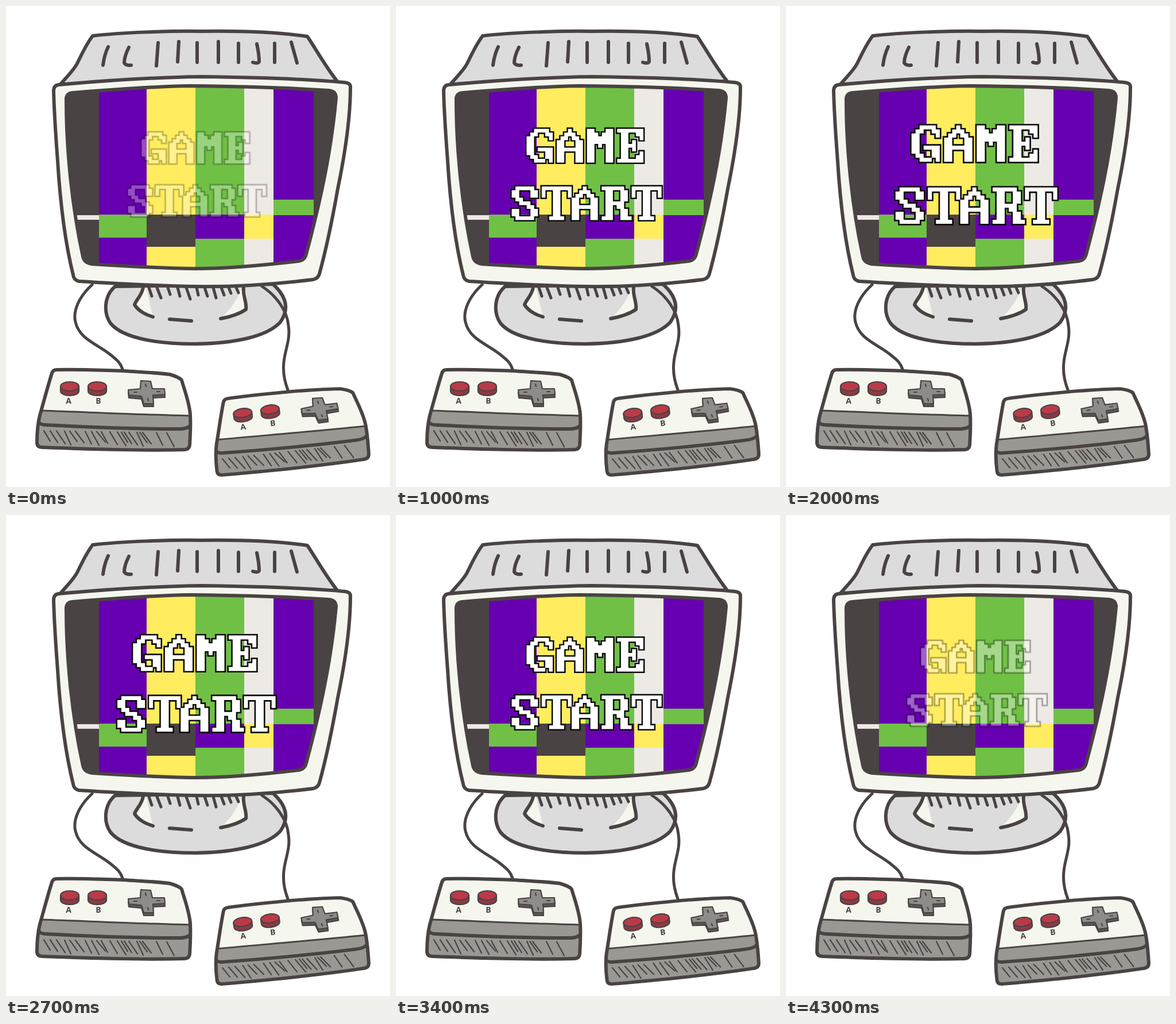
Write an HTML page that moves like this. It is 669 px wide and 837 px high and loops after 4.4 s.

```html
<!DOCTYPE html>
<html lang="en">
<head>
<meta charset="utf-8">
<title>Game start</title>
<style>
  html, body { margin: 0; width: 100%; height: 100%; overflow: hidden; background: #fff; }
  svg { display: block; width: 100%; height: 100%; }
  .ink { stroke: #4a4343; stroke-width: 6; stroke-linecap: round; stroke-linejoin: round; fill: none; }
  .thin { stroke-width: 2.2; }
  .mid { stroke-width: 5; }
  .shell { fill: #dcdcdc; }
  .cream { fill: #f5f7ef; }
  .dark { fill: #4a4343; }
  .purple { fill: #6700b0; }
  .yellow { fill: #ffed5f; }
  .green { fill: #70c046; }
  .beige { fill: #ede9e4; }
  .grey { fill: #999892; }
  .label { font: 700 14px "Open Sans", sans-serif; fill: #4a4343; text-anchor: middle; }
  #title path { fill: #fff; fill-rule: evenodd; stroke: #0b0b0b; stroke-width: .76; paint-order: stroke; }
</style>
</head>
<body>
<svg viewBox="0 0 669 837">
  <defs>
    <path id="glass" d="M105 165Q104 152 116 151C190 145 260 140 320 139C410 140 490 142 562 147Q575 148 575 160C566 260 545 350 523 432Q520 443 509 444C450 451 390 457 330 457C270 456 210 453 150 449Q136 447 134 436C115 350 105 250 105 165z"/>
    <clipPath id="screen"><use href="#glass"/></clipPath>
    <path id="cross" d="M235 652L252 653L255 666L276 666L277 676L256 677L257 692L240 692L236 679L214 677L213 668L234 666z"/>
    <path id="case" d="M88 633C130 632 165 634 205 635C235 637 262 638 285 641Q302 646 306 651C312 672 320 692 321 712C322 732 321 748 320 764Q319 772 310 772C228 774 145 771 64 768Q54 768 54 760C54 744 55 728 59 712C66 688 72 664 80 639Q82 633 88 633z"/>
    <g id="button">
      <path class="ink thin" style="fill:#8c3a44" d="M95 662v8a16 8 0 0 0 32 0v-8z"/>
      <ellipse class="ink thin" style="fill:#bb3a48" cx="111" cy="662" rx="16" ry="8"/>
    </g>
    <g id="pad">
      <use href="#case" class="cream"/>
      <path class="grey" d="M62 704C148 707 235 710 321 713C322 732 321 748 320 764Q319 772 310 772C228 774 145 771 64 768Q54 768 54 760C54 744 55 728 62 704z"/>
      <path class="ink" style="stroke-width:3" d="M63 704C148 707 235 711 320 713"/>
      <path class="ink" d="M57 724Q60 729 70 729C145 733 220 736 300 736Q317 736 321 730"/>
      <path id="hatch" class="ink thin"/>
      <use href="#case" class="ink"/>
      <use href="#button"/>
      <use href="#button" x="48"/>
      <text class="label" x="109" y="692">A</text>
      <text class="label" x="161" y="692">B</text>
      <g class="ink thin">
        <use href="#cross" y="5" fill="#5c5856"/>
        <use href="#cross" fill="#8d8c88"/>
        <path d="M243 658l1 4M223 672h5M263 671h5M247 683l1 4"/>
      </g>
    </g>
  </defs>

  <!-- Stand -->
  <path class="ink shell" d="M190 488C170 505 170 535 182 552C205 580 270 588 330 588C400 587 455 575 478 550C492 530 492 508 465 484z"/>
  <path class="cream" d="M239 490C236 505 226 512 224 520C232 532 244 537 256 541L244 490zM414 490C412 505 420 515 418 528C405 537 390 541 374 544Q400 520 411 490z"/>
  <path class="ink" d="M239 490C236 505 226 512 224 520C232 532 244 537 256 541M414 490C412 505 420 515 418 528C405 537 390 541 374 544M285 545L323 548"/>
  <path class="ink mid" d="M249 490l5 15M263 490l7 18M282 490l4 12M299 490l4 15M314 490l7 20M332 490l3 13M346 490l5 15M361 490l5 18M375 490l5 13M388 490l4 10M401 490l4 9"/>

  <!-- Cables -->
  <path class="ink mid" d="M150 485C128 505 116 530 121 550C128 580 159 588 181 606C195 617 200 622 203 632M446 488C470 503 490 530 492 556C496 580 486 598 484 620C482 638 486 655 491 668"/>

  <!-- Monitor -->
  <path class="ink shell" d="M95 136C105 124 118 112 124 100C133 82 140 66 151 52C200 46 290 43 340 44C400 43 470 45 525 53C540 75 555 103 577 131z"/>
  <path class="ink" d="M178 71Q171 86 169 103M214 72Q206 88 206 99Q209 104 218 103M265 64L262 104M301 62L299 97M333 64V98M370 62V98M405 65V98M437 66Q441 84 441 97Q438 101 430 98M468 65V98M497 63L507 99"/>
  <path class="ink cream" d="M83 148Q83 138 92 137C170 130 260 124 340 123C430 124 510 126 590 133Q601 134 600 142C600 200 590 260 578 318C567 380 556 430 546 466Q544 474 535 476C470 484 400 489 330 488C260 487 190 483 127 479Q118 477 117 468C105 420 95 350 90 270C87 230 84 190 83 148z"/>
  <g clip-path="url(#screen)">
    <rect class="dark" x="90" y="130" width="500" height="340"/>
    <g id="bars"></g>
  </g>
  <use href="#glass" class="ink"/>

  <use href="#pad"/>
  <use href="#pad" transform="translate(412.5 710) rotate(-7.2) scale(1 .97) translate(-111 -664)"/>

  <g id="title"></g>
</svg>
<script>
const byId = id => document.getElementById(id);

// Each bar: x, width, then alternating colour and top edge
const bars = [
  [123, 39, "beige", 364, "dark", 372],
  [162, 83, "purple", 130, "green", 363, "purple", 403],
  [245, 85, "yellow", 130, "dark", 363, "yellow", 419],
  [330, 85, "green", 130, "purple", 363, "green", 405],
  [415, 51, "beige", 130, "yellow", 363, "beige", 405],
  [466, 70, "purple", 130, "green", 337, "purple", 364],
];
byId("bars").innerHTML = bars.map(([x, w, ...bands]) => {
  let out = "";
  for (let i = 0; i < bands.length; i += 2)
    out += `<rect class="${bands[i]}" x="${x}" y="${bands[i + 1]}" width="${w}" height="${470 - bands[i + 1]}"/>`;
  return out;
}).join("");

const hatches = [66, 77, 88, 102, 111, 121, 138, 149, 158, 166, 181, 194, 201, 206, 214, 228, 233, 238, 262, 280];
byId("hatch").setAttribute("d", hatches.map((x, i) =>
  `M${x} ${738 + x / 60}l${11 + i % 3 * 2} ${18 + i % 4 * 2}`).join(""));

// Block letters, nine units high
const glyphs = {
  G: "M2 0h4v1h1v2h-1v-1h-1v-1h-2v1h-1v5h1v1h2v-2h-2v-1h4v4h-1v-1h-1v1h-3v-1h-1v-1h-1v-5h1v-1h1z",
  A: "M3 0h1v1h1v1h1v1h1v6h-2v-3h-3v3h-2v-6h1v-1h1v-1h1zM3 2v1h-1v2h3v-2h-1v-1z",
  M: "M0 0h2v1h1v1h1v-1h1v-1h2v9h-2v-5h-1v1h-1v-1h-1v5h-2z",
  E: "M0 0h7v3h-1v-1h-1v-1h-2v3h1v-1h1v3h-1v-1h-1v3h2v-1h1v-1h1v3h-7v-1h1v-7h-1z",
  S: "M1 0h5v1h1v2h-2v-2h-3v2h1v1h2v1h1v1h1v2h-1v1h-5v-1h-1v-2h2v2h3v-2h-1v-1h-2v-1h-1v-1h-1v-2h1z",
  T: "M0 0h8v3h-1v-2h-2v7h1v1h-4v-1h1v-7h-2v2h-1z",
  R: "M0 0h6v1h1v3h-1v2h1v2h1v1h-3v-3h-1v-1h-1v4h-3v-1h1v-7h-1zM3 1h2v3h-2z",
};

function word(text, x, y, pitch) {
  const d = [...text].map((letter, i) =>
    glyphs[letter].replace(/M(\d)/g, (_, start) => "M" + (+start + i * pitch))).join("");
  return `<path transform="translate(${x} ${y}) scale(7.03)" d="${d}"/>`;
}

const title = byId("title");
title.innerHTML = word("GAME", 218.7, 207.8, 8.08) + word("START", 190.8, 315.8, 8.02);

function draw(now) {
  const step = Math.floor(now % 4400 / 100);
  const p = Math.min(step, 20, 44 - step) / 20;
  title.setAttribute("transform", `translate(338 290) scale(${0.853 + 0.147 * p}) translate(-338 -290)`);
  title.setAttribute("opacity", Math.min(1, 0.3 + 1.6 * p));
}

const start = performance.now();
function tick() {
  draw(performance.now() - start);
  requestAnimationFrame(tick);
}
tick();
</script>
</body>
</html>
```
